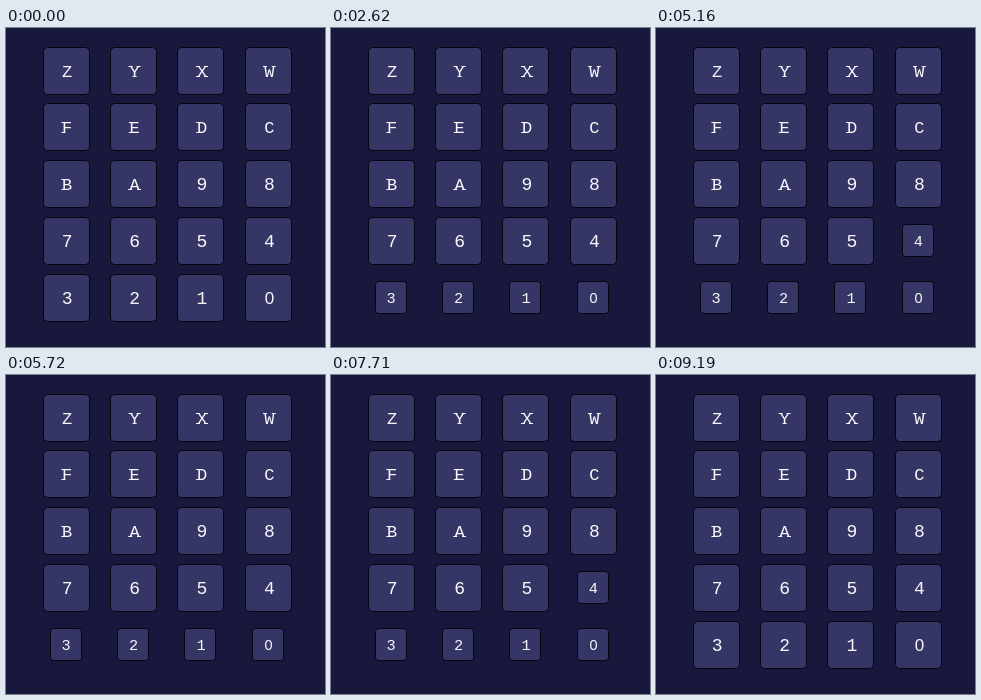
An HTML page with a canvas that plays this animation: 319 px wide and 319 px high, repeating every 9320 ms.

```html
<!DOCTYPE html>
<html lang="en">
<head>
<meta charset="utf-8">
<title>Keypad</title>
<style>
html, body { margin: 0; width: 100%; height: 100%; overflow: hidden; background: #17183b; }
canvas { display: block; width: 319px; height: 319px; }
</style>
</head>
<body>
<canvas></canvas>
<script>
const SIZE = 319, LOOP = 9320;
const LABELS = "ZYXWFEDCBA9876543210";
const PITCH_X = 67.4, PITCH_Y = 56.75;

// Each entry is a time followed by the keys that flip between up and down.
const TOGGLES = [
  [1500, "0"], [1930, "1"], [2240, "2"], [2620, "3"],
  [3450, "4"], [3960, "5"], [4190, "5"],
  [4620, "4"], [4800, "4"], [5030, "4"], [5160, "4"],
  [5390, "4"], [5540, "4"], [5720, "4"],
  [5950, "5"], [6410, "54"], [7300, "54"], [7330, "5"],
  [7710, "4"], [8120, "4"], [8450, "4"],
  [9040, "43"], [9110, "21"], [9190, "0"]
];

// Slab serifs: horizontal offset from the letter's middle, 1 = top, 0 = foot.
const STEM = [[-3.8, 1], [-3.8, 0]];
const SLABS = {
  Y: [[-4, 1], [4, 1], [0, 0]],
  X: [[-4, 1], [4, 1], [-4, 0], [4, 0]],
  W: [[-4.4, 1], [4.4, 1]],
  A: [[-4.4, 0], [4.4, 0]],
  F: STEM, E: STEM, D: STEM, B: STEM
};

const canvas = document.querySelector("canvas");
const ctx = canvas.getContext("2d");
const ratio = window.devicePixelRatio || 1;
canvas.width = canvas.height = Math.round(SIZE * ratio);
ctx.scale(ratio, ratio);
ctx.textAlign = "center";

function labelFont(label, scale) {
  if (label === "0") return `${17 * scale}px "Liberation Sans", sans-serif`;
  const size = label >= "A" ? 17 : 18;
  return `${size * scale}px "Liberation Mono", monospace`;
}

function drawLabel(label, x, y, scale) {
  ctx.font = labelFont(label, scale);
  ctx.fillStyle = "#f8f8fc";
  ctx.fillText(label, x, y);
  for (const [dx, top] of SLABS[label] || []) {
    ctx.fillRect(x + dx - 2, y - (top ? 11 : 1), 4, 1);
  }
}

function drawKey(index, down) {
  const col = index % 4, row = Math.floor(index / 4);
  const left = Math.floor(37 + PITCH_X * col);
  const top = Math.floor(19 + PITCH_Y * row);
  const inset = down ? 7.5 : 0.5;
  const [width, height] = down ? [31, 32] : [46, 47];
  ctx.beginPath();
  ctx.roundRect(left + inset, top + inset, width, height, down ? 3 : 4);
  ctx.fillStyle = "#363666";
  ctx.fill();
  ctx.strokeStyle = "#05050f";
  ctx.stroke();
  const textX = (down ? 60.2 : 61.2) + PITCH_X * col;
  drawLabel(LABELS[index], textX, top + (down ? 29 : 30), down ? 0.85 : 1);
}

function draw(time) {
  const pressed = new Set();
  for (const [at, keys] of TOGGLES) {
    if (at > time) break;
    for (const key of keys) {
      if (!pressed.delete(key)) pressed.add(key);
    }
  }
  ctx.fillStyle = "#17183b";
  ctx.fillRect(0, 0, SIZE, SIZE);
  for (let i = 0; i < LABELS.length; i++) drawKey(i, pressed.has(LABELS[i]));
}

const start = performance.now();
function tick() {
  draw((performance.now() - start) % LOOP);
  requestAnimationFrame(tick);
}
tick();
</script>
</body>
</html>
```
